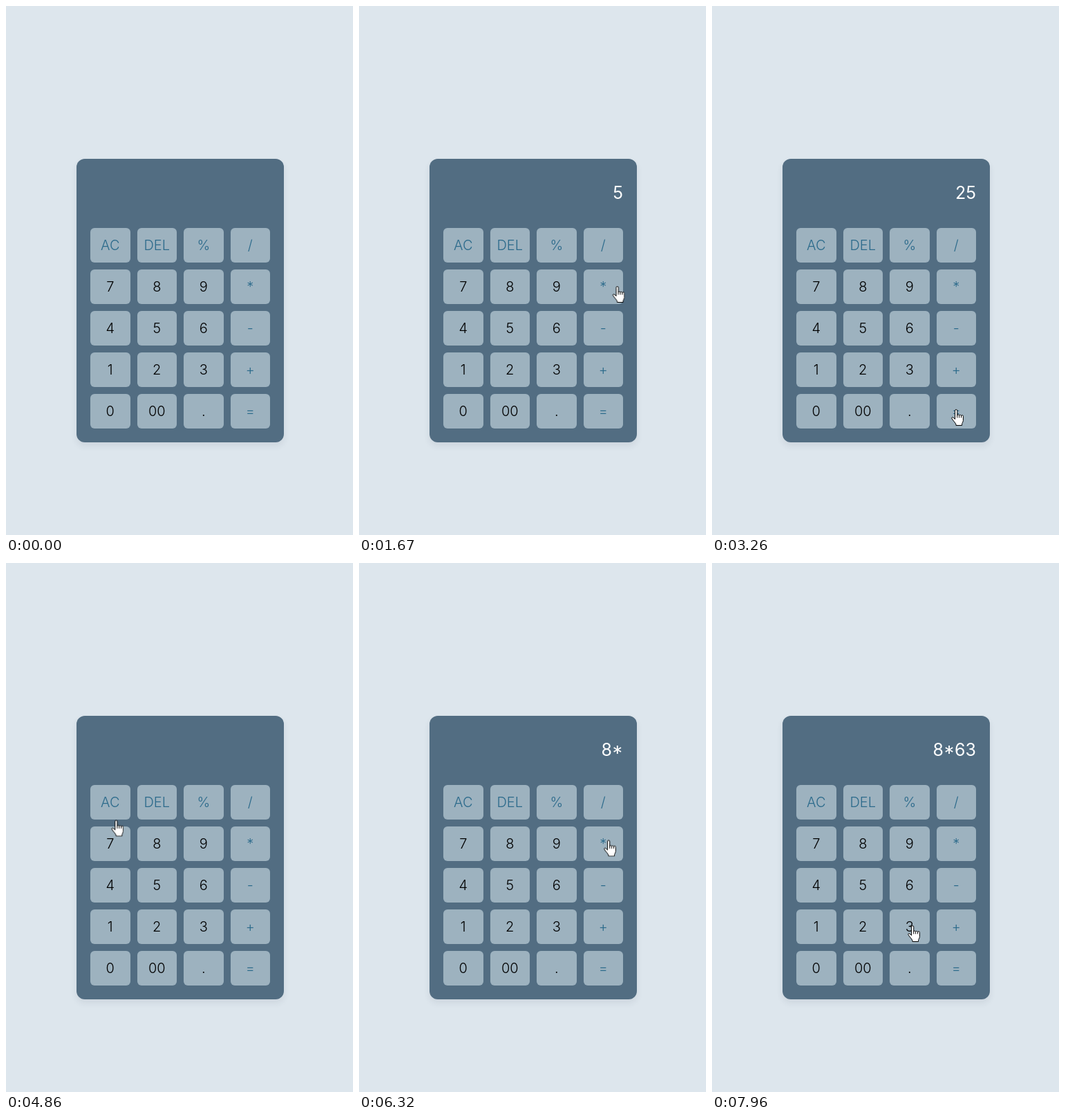
Recreate the animation shown at these times as an HTML page. Size 502 px wide and 765 px high, loop 8 s.

```html
<!DOCTYPE html>
<html lang="en">
<head>
<meta charset="utf-8">
<title>Calculator</title>
<style>
  html, body { margin: 0; width: 100%; height: 100%; overflow: hidden; }
  body {
    position: relative;
    background: #dde6ed;
    font: 300 20px Inter, "Open Sans", sans-serif;
  }
  .calc {
    position: absolute; left: 102px; top: 221px;
    box-sizing: border-box; width: 300px; height: 410px; padding: 20px;
    border-radius: 12px;
    background: #526d82;
    box-shadow: 0 5px 10px rgba(39, 55, 77, .09);
  }
  .screen {
    height: 80px;
    font-size: 25px; font-weight: 400; line-height: 59px;
    text-align: right; color: #fff;
  }
  .screen::after { content: ""; animation: type 8s step-end infinite; }
  .keys { display: grid; grid-template-columns: repeat(4, 1fr); grid-auto-rows: 50px; gap: 10px; }
  .keys span {
    border-radius: 6px;
    background: #9db2bf;
    line-height: 50px; text-align: center; color: #000;
  }
  .keys .op { color: #2b6a8b; }
  .press, .cursor { position: absolute; left: 0; top: 0; }
  .press {
    box-sizing: border-box; width: 58px; height: 50px;
    border: 1px solid #b2c1cb; border-radius: 6px;
    opacity: 0;
    animation: press 8s step-end infinite;
  }
  .cursor { width: 18px; height: 24px; opacity: 0; animation: move 8s linear infinite; }
  .cursor svg { position: absolute; left: 0; top: 0; }
  .dot {
    position: absolute; left: -6px; top: -12px;
    width: 24px; height: 24px; border-radius: 50%;
    background: rgba(214, 224, 64, .8);
    opacity: 0;
    animation: dot 8s step-end infinite;
  }

  @keyframes type {
    0% { content: ""; }
    15.875% { content: "5"; }
    26% { content: "5*"; }
    31.25% { content: "5*5"; }
    37.375% { content: "25"; }
    57.5% { content: ""; }
    67.875% { content: "8"; }
    77.875% { content: "8*"; }
    88.375% { content: "8*6"; }
    99.5%, 100% { content: "8*63"; }
  }

  @keyframes press {
    0%, 15.875%, 26%, 31.25%, 37.375%, 57.5%, 67.875%, 77.875%, 88.375%, 99.5%, 100% { opacity: 0; }
    14.25%, 29.625% { opacity: 1; transform: translate(189px, 441px); }
    24.375%, 76.25% { opacity: 1; transform: translate(324px, 381px); }
    35.625% { opacity: 1; transform: translate(324px, 561px); }
    55.75% { opacity: 1; transform: translate(122px, 321px); }
    66.25% { opacity: 1; transform: translate(189px, 381px); }
    86.625% { opacity: 1; transform: translate(257px, 441px); }
    97.875% { opacity: 1; transform: translate(257px, 501px); }
  }

  @keyframes dot {
    0%, 15.875%, 26%, 31.25%, 37.375%, 57.5%, 67.875%, 77.875%, 88.375%, 99.5%, 100% { opacity: 0; }
    14.25%, 24.375%, 29.625%, 35.625%, 55.75%, 66.25%, 76.25%, 86.625%, 97.875% { opacity: 1; }
  }

  @keyframes move {
    0% { opacity: 0; transform: translate(388px, 745px); animation-timing-function: step-end; }
    3.25% { opacity: 1; transform: translate(388px, 745px); animation-timing-function: ease-out; }
    12.875%, 15.875% { transform: translate(217px, 468px); }
    16.75% { transform: translate(222px, 479px); animation-timing-function: ease-in-out; }
    20.75% { transform: translate(367px, 405px); }
    23%, 26% { transform: translate(358px, 405px); animation-timing-function: ease-in-out; }
    29.5%, 31.25% { transform: translate(211px, 462px); animation-timing-function: ease-in; }
    33.875% { transform: translate(326px, 527px); animation-timing-function: ease-out; }
    35.625%, 45.75% { transform: translate(346px, 583px); animation-timing-function: ease-in-out; }
    55%, 60% { transform: translate(146px, 345px); }
    60.75% { transform: translate(152px, 371px); }
    63% { transform: translate(186px, 460px); animation-timing-function: ease-in-out; }
    66%, 67.875% { transform: translate(211px, 405px); }
    70.25% { transform: translate(265px, 416px); animation-timing-function: ease-out; }
    73.75%, 77.875% { transform: translate(371px, 394px); animation-timing-function: ease-in-out; }
    82.25% { transform: translate(249px, 440px); animation-timing-function: ease-out; }
    85.75%, 88.375% { transform: translate(275px, 460px); animation-timing-function: ease-in-out; }
    95.5%, 100% { opacity: 1; transform: translate(283px, 524px); }
  }
</style>
</head>
<body>
<div class="calc">
  <div class="screen"></div>
  <div class="keys">
    <span class="op">AC</span><span class="op">DEL</span><span class="op">%</span><span class="op">/</span>
    <span>7</span><span>8</span><span>9</span><span class="op">*</span>
    <span>4</span><span>5</span><span>6</span><span class="op">-</span>
    <span>1</span><span>2</span><span>3</span><span class="op">+</span>
    <span>0</span><span>00</span><span>.</span><span class="op">=</span>
  </div>
</div>
<div class="press"></div>
<div class="cursor">
  <div class="dot"></div>
  <svg width="18" height="24" fill="#fff" stroke="#000" stroke-linejoin="round">
    <path d="M5.6 14.5V2.2a1.6 1.6 0 0 1 3.2 0V9a1.5 1.5 0 0 1 2.9.3a1.5 1.5 0 0 1 2.9.6a1.4 1.4 0 0 1 2.8.6v6c0 2-1.8 3.5-1.8 5.3v1.7H7V22C6 19.5 3 17 1 13.6c-.7-1.3.9-2.5 2-1.5z"/>
    <path d="M8.8 9v3.5M11.7 9.3v3.2M14.6 9.9v2.6"/>
  </svg>
</div>
</body>
</html>
```
